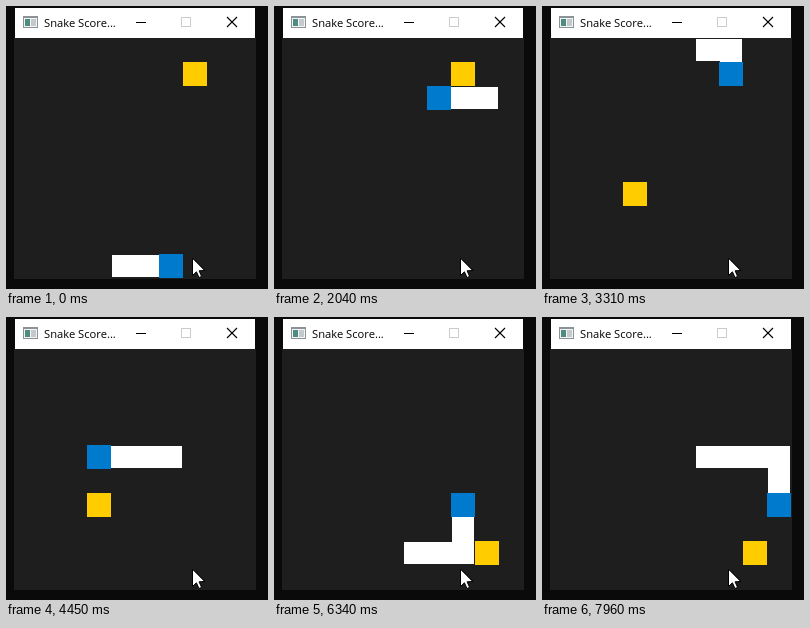
Write an HTML page with a canvas that moves like this. It is 262x283 px and loops after 8 s.

```html
<!DOCTYPE html>
<html lang="en">
<head>
<meta charset="utf-8">
<title>Snake</title>
<style>
  html, body { margin: 0; height: 100%; overflow: hidden; background: #0a0a0a; }
  canvas { display: block; }
</style>
</head>
<body>
<canvas id="stage" width="262" height="283"></canvas>
<script>
const ctx = document.getElementById('stage').getContext('2d');
const LOOP = 8000, CELL = 24, LEFT = 9, TOP = 32;
const DIRS = { U: [0, -1], D: [0, 1], L: [-1, 0], R: [1, 0] };
const FOODS = [[7, 1], [3, 6], [7, 6], [8, 8]];

// Each run: time of its first move, time of its last move, moves
const RUNS = [
  [150, 580, 'UUUR'],
  [850, 850, 'R'], [850, 1460, 'RUUUU'],
  [1740, 2040, 'LLL'], [2190, 2880, 'LLUURR'],
  [3180, 3310, 'RD'], [3460, 3740, 'DDD'],
  [4020, 4450, 'LLLL'],
  [4750, 5460, 'DDDDRR'],
  [5760, 6800, 'RRUUULLL'],
  [6950, 7380, 'URRR'],
  [7680, 7680, 'R'], [7680, 7960, 'RDD']
];

const moves = RUNS.flatMap(([start, end, keys]) => [...keys].map((key, i) => ({
  time: 10 * Math.round((start + (end - start) * i / (keys.length - 1 || 1)) / 10),
  dir: DIRS[key]
})));

function gameAt(time) {
  let snake = [[6, 9], [5, 9], [4, 9]], length = 3, eaten = 0;
  for (const move of moves) {
    if (move.time > time) break;
    const head = snake[0].map((v, i) => v + move.dir[i]);
    snake = [head, ...snake].slice(0, length);
    // The extra segment shows one move after eating
    if (String(head) === String(FOODS[eaten])) { eaten++; length++; }
  }
  return { snake, food: FOODS[eaten] };
}

function rect(color, x, y, w, h) {
  ctx.fillStyle = color;
  ctx.fillRect(x, y, w, h);
}

function line(color, width, points) {
  ctx.strokeStyle = color;
  ctx.lineWidth = width;
  ctx.beginPath();
  points.forEach(([x, y]) => ctx.lineTo(x, y));
  ctx.stroke();
}

function square(color, [col, row]) {
  rect(color, LEFT + col * CELL, TOP + row * CELL, CELL, CELL);
}

function drawWindow() {
  rect('#0a0a0a', 0, 0, 262, 283);
  rect('#1e1e1e', 8, 32, 242, 241);
  rect('#fff', 9, 2, 240, 30);

  rect('#8b9298', 17, 10, 15, 12);
  rect('#f2f4f5', 18, 12, 13, 9);
  rect('#4f8c80', 19, 13, 5, 7);
  rect('#c3c9cd', 25, 13, 5, 7);

  ctx.fillStyle = '#000';
  ctx.font = '11.2px "Open Sans", sans-serif';
  ctx.fillText('Snake Score...', 38, 21);

  ctx.lineCap = 'butt';
  rect('#000', 130, 16, 10, 1);
  ctx.strokeStyle = '#ccc';
  ctx.lineWidth = 1;
  ctx.strokeRect(175.5, 11.5, 9, 9);
  line('#000', 1.1, [[221, 11], [231, 21]]);
  line('#000', 1.1, [[231, 11], [221, 21]]);
}

function drawCursor() {
  ctx.beginPath();
  [[186.5, 252.5], [186.5, 269.5], [190.4, 265.8], [193, 271.5], [195.6, 270.4],
   [193.1, 264.8], [198.4, 264.5]].forEach(([x, y]) => ctx.lineTo(x, y));
  ctx.closePath();
  ctx.fillStyle = '#fff';
  ctx.fill();
  ctx.strokeStyle = '#000';
  ctx.lineWidth = 1;
  ctx.stroke();
}

function draw(time) {
  const { snake, food } = gameAt(time);
  drawWindow();
  square('#fc0', food);
  ctx.lineCap = 'square';
  line('#fff', CELL - 2, snake.map(([col, row]) =>
    [LEFT + (col + 0.5) * CELL, TOP + (row + 0.5) * CELL]));
  square('#007acc', snake[0]);
  drawCursor();
}

function tick() {
  draw(performance.now() % LOOP);
  requestAnimationFrame(tick);
}
tick();
</script>
</body>
</html>
```
